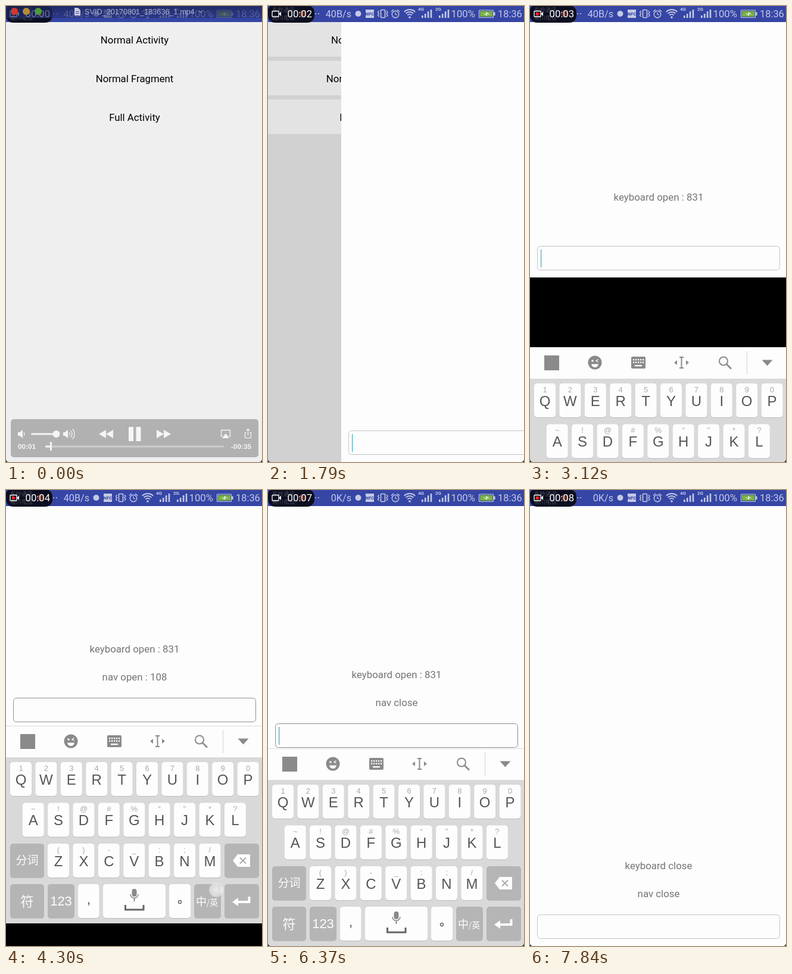
Write an HTML page with a canvas that moves like this. It is 430x766 px and loops after 8 s.

```html
<!DOCTYPE html>
<html lang="en">
<head>
<meta charset="utf-8">
<style>
html, body { margin: 0; width: 100%; height: 100%; overflow: hidden; background: #fdfdfd; }
canvas { display: block; }
</style>
</head>
<body>
<canvas id="stage" width="430" height="766"></canvas>
<script>
const W = 430, H = 766, LOOP = 8000, TICK = 147.9;
const c = document.getElementById('stage').getContext('2d');
const ROBOTO = 'Roboto, sans-serif', ARIAL = '"Liberation Sans", sans-serif', CJK = '"Noto Sans CJK SC", "Noto Sans CJK", sans-serif';

// Motion tracks: [tick, value] pairs, linear in between
const slideTrack = [[10, 430], [11, 290], [12, 123], [13, 40], [14, 8], [15, 0]];
const keysTrack = [[20, 332], [21, 139], [22, 25], [23, 0], [47, 0], [48, 50], [49, 210], [50, 332]];
const navTrack = [[27, 0], [28, 22], [29, 38], [30, 43], [37, 43], [38, 30], [39, 8], [40, 0]];
const pageTrack = [[20, 0], [21, -310], [22, -321], [28, -321], [29, -364], [38, -364], [39, -321], [48, -321], [49, 0]];
const secondTicks = [6, 9, 16, 23, 30, 36, 42, 50];

function at(track, k) {
  if (k <= track[0][0]) return track[0][1];
  for (let i = 1; i < track.length; i++) {
    const [a, u] = track[i - 1], [b, v] = track[i];
    if (k <= b) return u + (v - u) * (k - a) / (b - a);
  }
  return track[track.length - 1][1];
}

function rect(x, y, w, h, color, r = 0) {
  c.fillStyle = color;
  c.beginPath();
  c.roundRect(x, y, w, h, r);
  c.fill();
}
function frame(x, y, w, h, color, r = 0, lw = 1) {
  c.strokeStyle = color;
  c.lineWidth = lw;
  c.beginPath();
  c.roundRect(x, y, w, h, r);
  c.stroke();
}
function disc(x, y, r, color) {
  c.fillStyle = color;
  c.beginPath();
  c.arc(x, y, r, 0, 7);
  c.fill();
}
function arc(x, y, r, a, b, color, lw = 1) {
  c.strokeStyle = color;
  c.lineWidth = lw;
  c.beginPath();
  c.arc(x, y, r, a * Math.PI, b * Math.PI);
  c.stroke();
}
function trace(points) {
  c.beginPath();
  for (let i = 0; i < points.length; i += 2) c.lineTo(points[i], points[i + 1]);
}
function line(points, color, lw = 1) {
  trace(points);
  c.strokeStyle = color;
  c.lineWidth = lw;
  c.stroke();
}
function poly(points, color) {
  trace(points);
  c.fillStyle = color;
  c.fill();
}
function text(s, x, y, size, color, align = 'center', family = ROBOTO, weight = 400) {
  c.font = `${weight} ${size}px ${family}`;
  c.textAlign = align;
  c.fillStyle = color;
  c.fillText(s, x, y);
}
function shifted(x, y, draw) {
  c.save();
  c.translate(x, y);
  draw();
  c.restore();
}

function menu(dim) {
  const grey = (a, b) => { const v = Math.round(a + (b - a) * dim); return `rgb(${v},${v},${v})`; };
  rect(0, 0, 520, H, grey(239, 197));
  ['Normal Activity', 'Normal Fragment', 'Full Activity'].forEach((label, i) => {
    rect(0, 27 + 65 * i, 520, 58, grey(239, 222));
    text(label, 216, 63 + 65 * i, 16.8, '#000');
  });
}

function page(k, y) {
  rect(0, 0, W, H + y, '#fdfdfd');
  if (k >= 21) text(k < 49 ? 'keyboard open : 831' : 'keyboard close', 216, 637 + y, 16.85, '#757575');
  if (k >= 29) text(k < 39 ? 'nav open : 108' : 'nav close', 216, 684 + y, 16.85, '#757575');
  // The hairline border looks stronger once the page has settled above the keyboard
  frame(12.5, 713.5 + y, 407, 40, y < -320 ? '#8f8f8f' : '#c4c4c4', 5);
  const phase = ((k - (k < 22 ? 12 : 43)) % 6.75 + 6.75) % 6.75;
  if (phase < 3) rect(18, 719 + y, 1.2, 30, '#3fa9b5');
}

function key(x, y, w, dark) {
  rect(x, y + 1, w, 57, '#bcbcbc', 5);
  rect(x, y, w, 57, dark ? '#b5b5b5' : '#fdfdfd', 5);
}
function letters(chars, hints, x, y) {
  [...chars].forEach((ch, i) => {
    const left = x + 42.4 * i;
    key(left, y, 36);
    text(hints[i], left + 18, y + 14.5, 13, '#aaa', 'center', ARIAL);
    text(ch, left + 18, y + 37.5, 24, '#555', 'center', ARIAL);
  });
}

function toolbar() {
  const g = '#8a8a8a', w = '#fdfdfd';
  rect(0, 0, W, 53, w);
  rect(0, 0, W, 1, '#dcdcdc');
  rect(24, 14, 25, 25, g);
  disc(109, 26, 11.5, g);
  disc(105, 23, 1.8, w);
  line([114.5, 20.5, 111, 23, 114.5, 25], w, 1.4);
  c.fillStyle = w;
  c.beginPath();
  c.arc(109, 28, 6, 0.1, Math.PI - 0.1);
  c.fill();
  rect(170, 16, 24, 20, g, 2);
  for (let i = 0; i < 10; i++) rect(173 + i % 5 * 4, 20 + (i > 4) * 4.5, 2.3, 2.3, w);
  rect(176, 30, 12, 2.3, w);
  line([251, 17, 258, 17], g, 2);
  line([251, 35, 258, 35], g, 2);
  line([254.5, 17, 254.5, 35], g, 2);
  poly([242, 26, 247, 22, 247, 30], g);
  poly([267, 26, 262, 22, 262, 30], g);
  arc(325, 23.5, 7, 0, 2, g, 2);
  line([330, 28.5, 338, 36.5], g, 2.6);
  rect(364, 7, 1, 39, '#d4d4d4');
  poly([389.5, 21.5, 407.5, 21.5, 398.5, 31.5], g);
}

function keyboard() {
  const w = '#fdfdfd', d = '#666', y = 266;
  rect(0, 52, W, 280, '#d9d9d9');
  toolbar();
  letters('QWERTYUIOP', '1234567890', 7, 61);
  letters('ASDFGHJKL', '~!@#%“"*?', 27.7, 129.5);
  letters('ZXCVBNM', '()-_:;/', 70, 198);
  key(7, 198, 57, true);
  text('分词', 35.5, 233, 19, w, 'center', CJK);
  key(367, 198, 58, true);
  poly([381, 226.5, 389, 216, 410, 216, 410, 237, 389, 237], w);
  line([393, 221.5, 403, 231.5], '#aaa', 2);
  line([403, 221.5, 393, 231.5], '#aaa', 2);

  key(7, y, 57, true);
  text('符', 35.5, y + 37, 22, w, 'center', CJK);
  key(70, y, 45, true);
  text('123', 92.5, y + 36, 22, w, 'center', ARIAL);
  key(121, y, 35.5);
  text(',', 139, y + 33, 22, '#555', 'center', ARIAL);
  key(163, y, 105);
  rect(211.5, y + 8, 8, 13, '#8a8a8a', 4);
  arc(215.5, y + 17, 6.5, 0, 1, '#8a8a8a', 1.5);
  line([215.5, y + 23, 215.5, y + 29], '#8a8a8a', 2);
  line([200.5, y + 35, 200.5, y + 43, 231, y + 43, 231, y + 35], d, 3);
  key(274, y, 36);
  arc(292, y + 30, 2.5, 0, 2, d, 1.4);
  key(316, y, 45, true);
  text('中', 328, y + 36, 18, w, 'center', CJK, 500);
  text('/英', 346.5, y + 36, 14, w, 'center', CJK);
  key(367, y, 58, true);
  line([408.5, y + 21, 408.5, y + 30, 388, y + 30], w, 4);
  poly([380, y + 30, 390, y + 23, 390, y + 37], w);
}

function bars(x, label, ink) {
  text(label, x, 8, 8, ink, 'left', ROBOTO, 700);
  [4, 7, 11, 14].forEach((h, i) => rect(x + 6 + 4.9 * i, 20 - h, 2.6, h, ink));
}

function statusBar(k) {
  const ink = '#c3c9e8', blue = '#3646a5';
  rect(0, 0, W, 27, blue);
  text(k < 32 ? '40B/s' : '0K/s', 140, 19, 16.2, ink, 'right');
  disc(151.5, 13, 5, ink);
  rect(164, 6, 14, 14, ink);
  text('NFC', 171, 16, 7.5, blue, 'center', ROBOTO, 700);
  frame(189.5, 6.5, 7, 13, ink, 1, 1.6);
  line([186.5, 8, 184.5, 10.5, 186.5, 13, 184.5, 15.5, 186.5, 18], ink, 1.3);
  line([199, 8, 201, 10.5, 199, 13, 201, 15.5, 199, 18], ink, 1.3);
  arc(214, 14, 5.7, 0, 2, ink, 1.4);
  line([214, 10.5, 214, 14, 217, 15], ink, 1.2);
  line([207, 9.5, 211, 6], ink, 1.5);
  line([221, 9.5, 217, 6], ink, 1.5);
  disc(238, 19, 1.8, ink);
  for (const r of [5, 9, 13]) arc(238, 19, r, 1.25, 1.75, ink, 2);
  bars(252, '4G', ink);
  bars(281, '2G', ink);
  text('100%', 307.5, 19, 16.7, ink, 'left');
  frame(354.5, 7, 24, 12.5, ink, 1, 1.2);
  rect(379, 10.5, 2.5, 5.5, ink);
  rect(356, 8.5, 21, 9.5, '#78b045');
  poly([361, 12, 367, 14, 366, 10, 373, 14.5, 367.5, 13, 368, 16.5], '#fff');
  text('18:36', 386, 19, 16.4, ink, 'left');
  disc(80, 13, 1, ink);
  disc(85, 13, 1, ink);

  // Recorder badge
  rect(0, -1, 78, 29, '#0b0e20', [8, 12, 12, 12]);
  text('东岭通讯', 7, 9.5, 9.5, '#4c4d56', 'left', CJK);
  text('南川电信', 7, 23, 9.5, '#44464f', 'left', CJK);
  disc(58, 13, 6, '#5c2a24');
  frame(7, 8.5, 11, 9.5, '#fff', 1, 1.3);
  poly([18, 13, 22, 9.5, 22, 17], '#fff');
  if (k < 8 || (k > 14 && k < 32) || k > 47) disc(12.3, 13.2, 2.7, '#f22');
  const s = secondTicks.filter(n => k >= n).length;
  text('00:0' + s, 32.5, 19.3, 16.7, '#fff', 'left');
}

function speaker(x, waves) {
  const w = '#f5f5f5';
  poly([x, 716, x + 3, 716, x + 8, 712, x + 8, 726, x + 3, 722, x, 722], w);
  for (let i = 1; i <= waves; i++) arc(x + 7, 719, 4 * i, -0.25, 0.25, w, 1.3);
}
function skip(x, dir) {
  for (const s of [0, 12]) poly([x + dir * s, 712, x + dir * (s + 12), 719, x + dir * s, 726], '#f5f5f5');
}

function player() {
  const w = '#f5f5f5';
  const shade = c.createLinearGradient(0, 0, 0, 21);
  shade.addColorStop(0, 'rgba(28,36,86,.8)');
  shade.addColorStop(1, 'rgba(36,48,120,.62)');
  rect(0, 0, W, 20.5, shade);
  ['#d0392f', '#b58a35', '#4d9a3c'].forEach((color, i) => disc(14 + 20 * i, 9, 6, color));
  poly([115, 3, 121, 3, 125, 7, 125, 16, 115, 16], '#c8cce0');
  rect(117, 9, 6, 1, '#4b5485');
  rect(117, 12, 6, 1, '#4b5485');
  text('SVID_20170801_183636_1.mp4', 132, 14, 12.7, '#a9b1d6', 'left', ARIAL);
  line([324, 8, 327, 11, 330, 8], '#8f98c4', 1.2);

  rect(8, 694, 416, 64, '#b1b1b1', 5);
  speaker(20, 1);
  rect(42, 717.5, 42, 3, w, 1.5);
  disc(84.5, 719, 6, w);
  speaker(96, 3);
  skip(180, -1);
  skip(253, 1);
  rect(206, 707, 8, 24, w);
  rect(218.5, 707, 8, 24, w);
  line([364, 722.5, 361.5, 722.5, 361.5, 712.5, 376.5, 712.5, 376.5, 722.5, 374, 722.5], w, 1.3);
  poly([363, 726, 369, 718, 375, 726], w);
  line([404, 716.5, 401.5, 716.5, 401.5, 725.5, 411.5, 725.5, 411.5, 716.5, 409, 716.5], w, 1.2);
  line([406.5, 721, 406.5, 711], w, 1.2);
  line([403.5, 713.5, 406.5, 710.5, 409.5, 713.5], w, 1.2);
  text('00:01', 20, 744, 11.8, w, 'left', ARIAL, 700);
  text('-00:35', 412, 744, 11.8, w, 'right', ARIAL, 700);
  rect(66, 738.5, 300, 3, '#cdcdcd', 1.5);
  rect(66, 738.5, 9, 3, w, 1.5);
  rect(74, 732, 3, 15, w, 1);
}

function touch(x, y, rgb, alpha) {
  const glow = c.createRadialGradient(x, y, 0, x, y, 13);
  glow.addColorStop(0, `rgba(${rgb},${alpha})`);
  glow.addColorStop(0.8, `rgba(${rgb},${alpha * 0.7})`);
  glow.addColorStop(1, `rgba(${rgb},0)`);
  disc(x, y, 13, glow);
}

function corners() {
  for (const [x, s] of [[0, 1], [W, -1]]) {
    c.fillStyle = '#000';
    c.beginPath();
    c.moveTo(x, H - 5);
    c.quadraticCurveTo(x, H, x + 5 * s, H);
    c.lineTo(x, H);
    c.fill();
  }
}

function draw(k) {
  const x = at(slideTrack, k), keys = at(keysTrack, k), nav = at(navTrack, k);
  rect(0, 0, W, H, '#000');
  if (x > 0) {
    const p = 1 - x / W;
    shifted(-74 * p, 0, () => menu(p));
  }
  if (x < W) shifted(x, 0, () => page(k, at(pageTrack, k)));
  if (keys < 332) shifted(0, 434 + keys - nav, keyboard);
  if (nav) rect(0, H - nav, W, nav, '#000');
  if (k === 28) touch(353, 735, '255,255,255', 0.7);
  if (k === 29) touch(353, 672, '255,255,255', 0.7);
  if (k === 36 || k === 37) touch(29, 760, '150,150,150', 0.75);
  statusBar(k);
  if (k < 3) {
    c.globalAlpha = 1 - k / 3;
    player();
    c.globalAlpha = 1;
  }
  corners();
}

const start = performance.now();
function run() {
  const t = (performance.now() - start) % LOOP;
  draw(Math.min(53, Math.floor(t / TICK)));
  requestAnimationFrame(run);
}
run();
</script>
</body>
</html>
```
